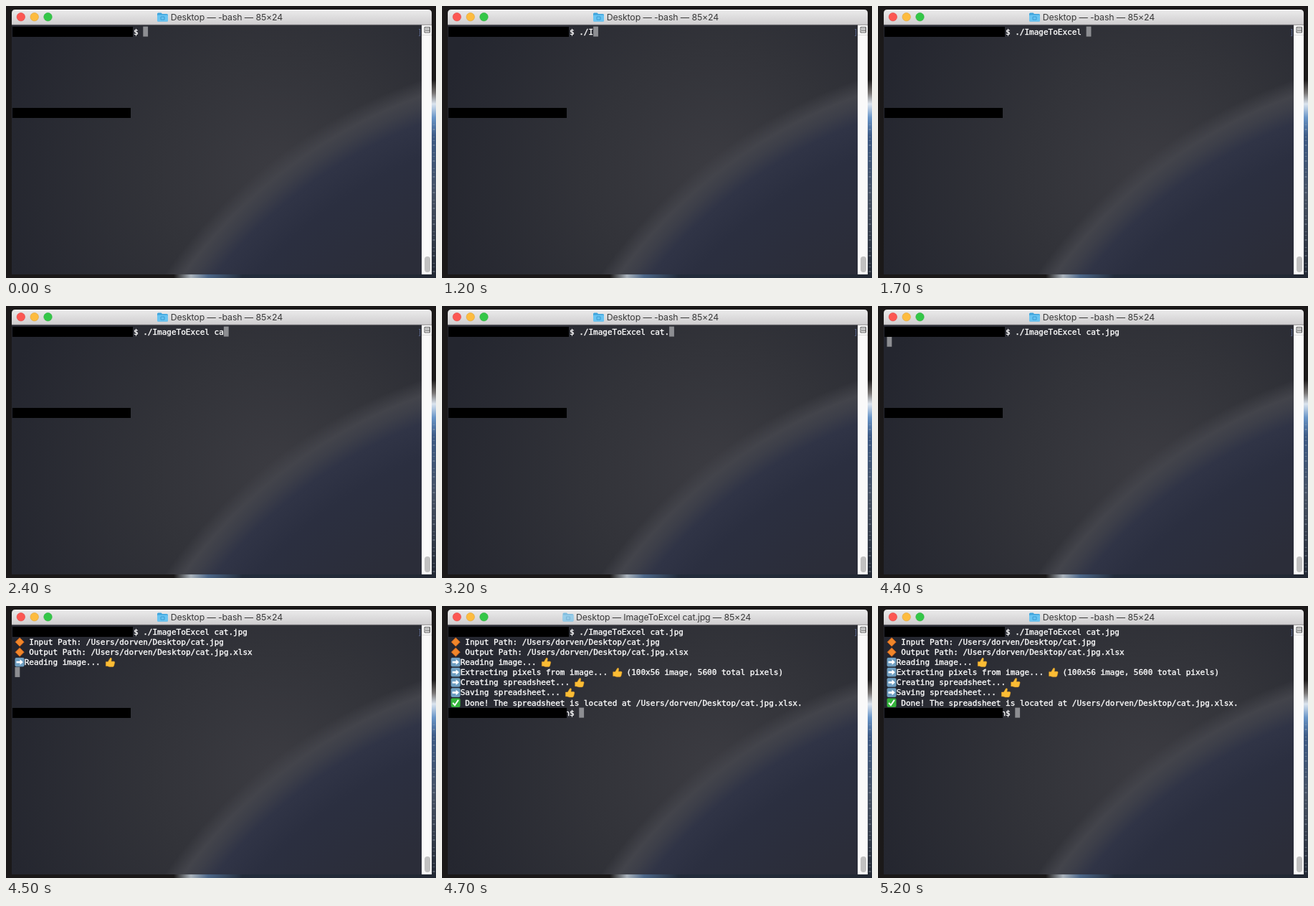
Animation, 600 px wide and 379 px high, one loop 5.3 s. Source, as an HTML page:

```html
<!DOCTYPE html>
<html lang="en">
<head>
<meta charset="utf-8">
<title>Terminal</title>
<style>
  html, body { margin: 0; width: 100%; height: 100%; overflow: hidden; background: #1b1919; }
  svg { display: block; width: 600px; height: 379px; }
  text { white-space: pre; }
  .mono { font: 11px "DejaVu Sans Mono", monospace; fill: #fff; stroke: #fff; stroke-width: .35px; }
  .title { font: 12.3px Inter, sans-serif; letter-spacing: -.1px; fill: #3a3a3a; }
</style>
</head>
<body>
<svg viewBox="0 0 600 379">
  <defs>
    <linearGradient id="bar" x2="0" y2="1">
      <stop stop-color="#ececec"/><stop offset="1" stop-color="#cfcdcf"/>
    </linearGradient>
    <radialGradient id="glow" gradientUnits="userSpaceOnUse" cx="385" cy="235" r="400">
      <stop stop-color="#3c3c42"/><stop offset=".45" stop-color="#323339"/>
      <stop offset="1" stop-color="#24262f"/>
    </radialGradient>
    <radialGradient id="planet" gradientUnits="userSpaceOnUse" cx="816" cy="788" r="725">
      <stop offset=".7" stop-color="#2b2d39"/><stop offset=".86" stop-color="#2b2f40"/>
      <stop offset=".92" stop-color="#303446"/><stop offset=".95" stop-color="#3d3f49"/>
      <stop offset=".97" stop-color="#43444b"/>
      <stop offset="1" stop-color="#43444b" stop-opacity="0"/>
    </radialGradient>
    <linearGradient id="right" x2="0" y2="1">
      <stop offset=".27" stop-color="#1b1919"/><stop offset=".32" stop-color="#777473"/>
      <stop offset=".36" stop-color="#dbe4ee"/><stop offset=".41" stop-color="#6a96c8"/>
      <stop offset=".48" stop-color="#3d5a84"/><stop offset=".7" stop-color="#485364"/>
      <stop offset="1" stop-color="#222833"/>
    </linearGradient>
    <linearGradient id="bottom">
      <stop offset=".39" stop-color="#1b1919"/><stop offset=".43" stop-color="#a9b2bb"/>
      <stop offset=".47" stop-color="#4b6688"/><stop offset=".55" stop-color="#232c3b"/>
      <stop offset="1" stop-color="#222833"/>
    </linearGradient>
    <clipPath id="screen"><path d="M8 26h572v348H8z"/></clipPath>

    <path id="diamond" d="M6.6 .6l6 6-6 6-6-6z" fill="#f0862a" stroke="#d9641a" stroke-width=".8"/>
    <g id="arrow">
      <rect width="13" height="12.6" rx="2" fill="#6f9fc2"/>
      <path d="M2 5h5V2.4l4.3 3.9L7 10.2V7.6H2z" fill="#fff"/>
    </g>
    <g id="check">
      <rect width="13" height="12.6" rx="2" fill="#35b53c"/>
      <path d="M2.6 6.6l2.8 3.2 5-7.3" fill="none" stroke="#fff" stroke-width="2"/>
    </g>
    <path id="thumb" fill="#fbbd35" stroke="#e09a24" stroke-width=".5"
      d="M1 6h3l3-5q2-1 2 1L8.5 5.500h4q1.500 .5 .8 2l-1 4q-.5 1.500-2 1.500h-4l-3.300-1H1z"/>
    <g id="folder">
      <path d="M0 2q0-1.500 1.500-1.500h4L7 2h6.500q1.500 0 1.500 1.500V11q0 1.500-1.500 1.500h-12Q0 12.500 0 11z" fill="#3fa4dc"/>
      <rect y="3.500" width="15" height="9" rx="1.300" fill="#69c4f2"/>
      <path d="M5 6h5v4H5z" fill="none" stroke="#3a9ad2"/>
    </g>
  </defs>

  <rect width="600" height="379" fill="#1b1919"/>
  <rect y="374" width="600" height="5" fill="url(#bottom)"/>
  <rect x="594" width="6" height="379" fill="url(#right)"/>
  <path d="M597 165V372" stroke="#a9b4c2" stroke-width="3" stroke-dasharray="1 5 2 9 1 4" opacity=".35"/>

  <g clip-path="url(#screen)">
    <rect x="8" y="26" width="572" height="348" fill="url(#glow)"/>
    <circle cx="816" cy="788" r="725" fill="url(#planet)"/>
  </g>
  <path d="M8 26V10q0-5 5-5h576q5 0 5 5v16z" fill="url(#bar)"/>
  <path d="M8 26h586" stroke="#a5a3a5" stroke-width=".8"/>
  <g stroke-width=".6">
    <circle cx="20.800" cy="15.200" r="5.700" fill="#fc5753" stroke="#dd4643"/>
    <circle cx="39.700" cy="15.200" r="5.700" fill="#fdbc40" stroke="#dc9f32"/>
    <circle cx="58.500" cy="15.200" r="5.700" fill="#34c748" stroke="#29a83a"/>
  </g>

  <path d="M580 26.500h14V374h-14z" fill="#fafafa"/>
  <rect x="584" y="349" width="8" height="22" rx="4" fill="#c1c1c1"/>
  <path d="M580 40.500h14" stroke="#ddd"/>
  <path d="M584 29.500h7.500v7.500H584zM585 32h6M585 34.500h6" fill="none" stroke="#555"/>

  <use id="icon" href="#folder" y="9"/>
  <text id="title" class="title" y="19.700"></text>

  <rect id="cursor" width="6.800" height="14" fill="#8d8e92"/>
  <g class="mono">
    <text x="178" y="39.700" id="command"></text>
    <text x="574" y="39.700" style="fill:#5b688e;stroke:none">]</text>
    <g id="output"></g>
  </g>
  <path d="M9 29h168v14H9zM9 142h165v14H9z"/>
</svg>

<script>
const LOOP = 5300, COL = 6.622, ROW = 14.13, LEFT = 12.5;
const $ = id => document.getElementById(id);
const colX = col => LEFT + col * COL;

// [time, text on the command line]
const typing = [
  [0, ""], [800, "."], [900, "./"], [1200, "./I"], [1500, "./Im"],
  [1600, "./ImageToExcel "], [2200, "./ImageToExcel c"], [2300, "./ImageToExcel ca"],
  [2600, "./ImageToExcel cat"], [2900, "./ImageToExcel cat."],
  [3600, "./ImageToExcel cat.j"], [3900, "./ImageToExcel cat.jp"], [4000, "./ImageToExcel cat.jpg"]
];

// [time, icon, text]; a thumb follows each "..."
const path = "/Users/dorven/Desktop/cat.jpg";
const lines = [
  [4500, "diamond", "   Input Path: " + path],
  [4500, "diamond", "   Output Path: " + path + ".xlsx"],
  [4500, "arrow", "  Reading image..."],
  [4600, "arrow", "  Extracting pixels from image...    (100x56 image, 5600 total pixels)"],
  [4700, "arrow", "  Creating spreadsheet..."],
  [4700, "arrow", "  Saving spreadsheet..."],
  [4700, "check", "   Done! The spreadsheet is located at " + path + ".xlsx."],
  [4700, "", " ".repeat(24) + "n$"]
];

const use = (name, x, y) => `<use href="#${name}" x="${x}" y="${y}"/>`;
$("output").innerHTML = lines.map(([, icon, text], i) => {
  const y = 39.7 + (i + 1) * ROW, dots = text.indexOf("...");
  return `<g><text x="${LEFT}" y="${y}">${text}</text>` +
    `<g stroke="none">${icon && use(icon, LEFT, y - 10.2)}` +
    `${dots < 0 ? "" : use("thumb", colX(dots + 4), y - 10.4)}</g></g>`;
}).join("");
const rows = [...$("output").children];

function draw(now) {
  const t = now % LOOP;
  const command = typing.filter(([at]) => at <= t).pop()[1];
  const shown = lines.filter(([at]) => at <= t).length;
  const running = t >= 4600 && t < 5000;

  $("command").textContent = "$ " + command;
  rows.forEach((row, i) => row.setAttribute("display", i < shown ? "inline" : "none"));

  let col = 27 + command.length, line = 0;
  if (t >= 4400) {
    line = Math.min(shown + 1, lines.length);
    col = shown === lines.length ? 27 : 0;
  }
  $("cursor").setAttribute("x", colX(col));
  $("cursor").setAttribute("y", 28.6 + line * ROW);

  $("title").textContent = `Desktop — ${running ? "ImageToExcel cat.jpg" : "-bash"} — 85×24`;
  $("title").setAttribute("x", running ? 187 : 229.7);
  $("icon").setAttribute("x", running ? 168.5 : 211);
  $("icon").setAttribute("opacity", running ? 0.6 : 1);
}

const start = performance.now();
(function tick() {
  draw(performance.now() - start);
  requestAnimationFrame(tick);
})();
</script>
</body>
</html>
```
